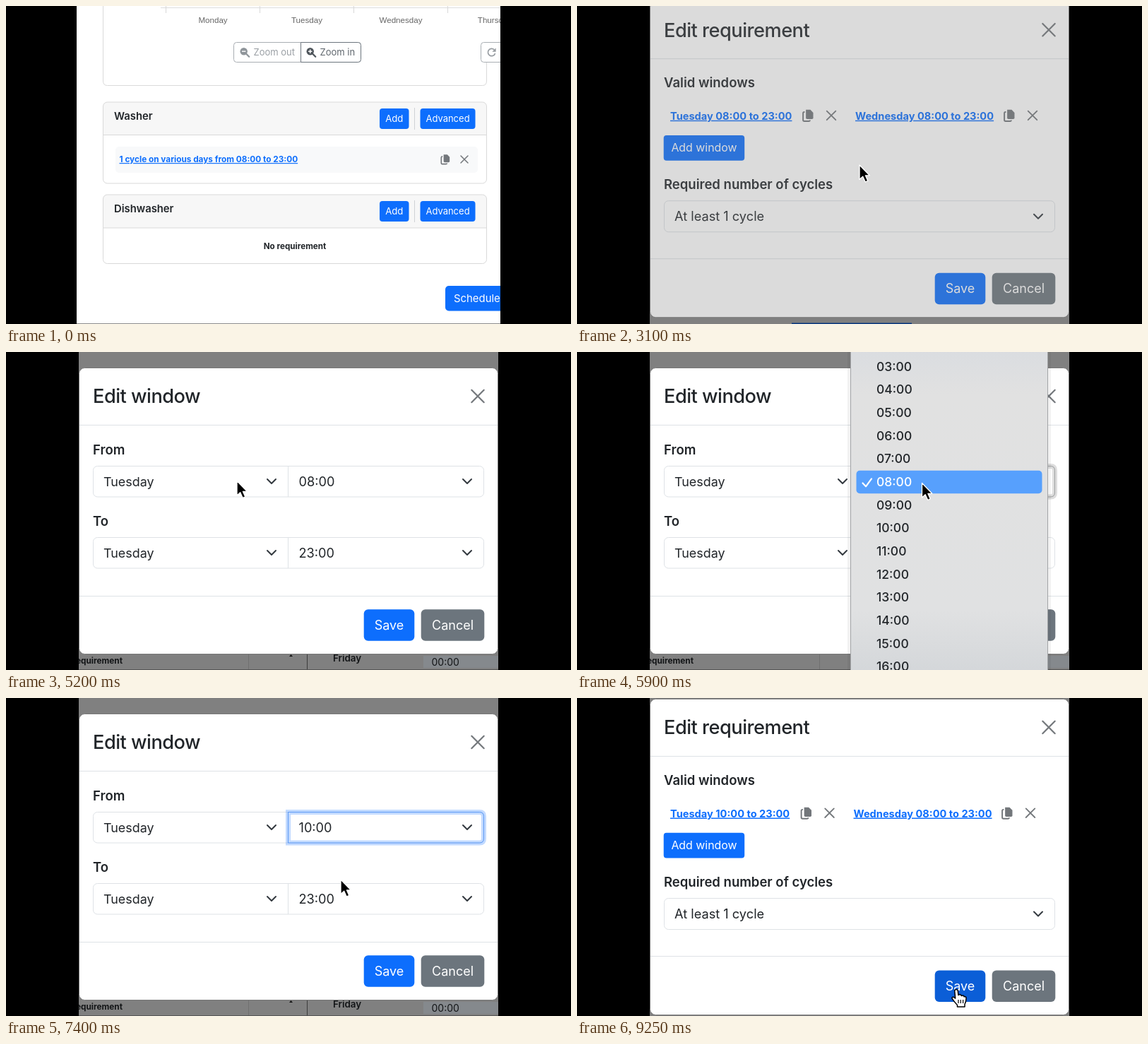
An HTML page for the animation above (9400 ms loop, 800 by 450 pixels).

```html
<!DOCTYPE html>
<html lang="en">
<head>
<meta charset="utf-8">
<title>Edit a requirement window</title>
<style>
  html, body { margin: 0; width: 100%; height: 100%; overflow: hidden; background: #000; }
  svg { display: block; width: 100vw; height: 100vh; }
  text { font-family: Inter, "Open Sans", sans-serif; white-space: pre; }
  .axis { font-family: "Liberation Sans", sans-serif; }
  .link { text-decoration: underline; }
</style>
</head>
<body>
<svg id="stage" viewBox="0 0 800 450"></svg>
<script>
const BLUE = '#0d6efd', HOVER_BLUE = '#0b5ed7', LINK_HOVER = '#0a58ca';
const GRAY = '#6c757d', INK = '#212529', BORDER = '#dee2e6', ICON = '#73777b';
const LOOP = 9400;

// Drawing helpers; text is placed by the middle of its capitals.
const text = (x, y, size, str, { weight = 400, fill = INK, anchor = 'start', extra = '' } = {}) =>
  `<text x="${x}" y="${y + size * 0.345}" font-size="${size}" font-weight="${weight}" fill="${fill}" text-anchor="${anchor}" ${extra}>${str}</text>`;
const rect = (x1, y1, x2, y2, fill, r = 0, extra = '') =>
  `<rect x="${x1}" y="${y1}" width="${x2 - x1}" height="${y2 - y1}" rx="${r}" fill="${fill}" ${extra}/>`;
const stroke = (d, color, width = 1, extra = '') =>
  `<path d="${d}" fill="none" stroke="${color}" stroke-width="${width}" ${extra}/>`;
const cross = (x, y, r, width) =>
  stroke(`M${x - r} ${y - r}l${2 * r} ${2 * r}m0 ${-2 * r}l${-2 * r} ${2 * r}`, ICON, width, 'stroke-linecap="round"');
const chevron = (x, y) =>
  stroke(`M${x - 6} ${y - 3}l6 6l6 -6`, '#343a40', 2, 'stroke-linecap="round" stroke-linejoin="round"');
const button = (x1, y1, x2, y2, label, size, fill = BLUE, id = '') =>
  rect(x1, y1, x2, y2, fill, size > 16 ? 6 : 4, id && `id="${id}"`) +
  text((x1 + x2) / 2, (y1 + y2) / 2, size, label, { fill: '#fff', anchor: 'middle' });
const copyIcon = (x, y, s) => `<g transform="translate(${x} ${y}) scale(${s})">
  <path d="M-2.5 -7H3L6.5 -3.5V3Q6.5 4.5 5 4.5H-1Q-2.5 4.5 -2.5 3Z" fill="${ICON}"/>
  ${stroke('M-4 -4.2H-4.5Q-6 -4.2 -6 -2.7V5.5Q-6 7 -4.5 7H1Q2.5 7 2.5 5.7', ICON, 1.7)}</g>`;
const magnifier = (x, y, color, plus) => `<circle cx="${x - 1.3}" cy="${y - 1.3}" r="5.2" fill="${color}"/>` +
  stroke(`M${x + 2} ${y + 2}l4.2 4.2`, color, 2.3, 'stroke-linecap="round"') +
  stroke(`M${x - 4} ${y - 1.3}h5.4` + (plus ? `M${x - 1.3} ${y - 4}v5.4` : ''), '#fff', 1.4);

const card = (top, split, bottom, name) =>
  rect(137.5, top, 680.5, bottom, '#fff', 6) +
  `<path d="M137.5 ${split}V${top + 6}q0 -6 6 -6H674.5q6 0 6 6V${split}Z" fill="#f7f7f7"/>` +
  stroke(`M137.5 ${split}H680.5`, '#d9d9d9') +
  rect(137.5, top, 680.5, bottom, 'none', 6, 'stroke="#d9d9d9"') +
  text(153, top + 20, 14.8, name, { weight: 600 }) +
  button(529, top + 9, 570.5, top + 38, 'Add', 13.2) +
  stroke(`M578.5 ${top + 8}v31`, '#cfd2d5') +
  button(586.5, top + 9, 664.5, top + 38, 'Advanced', 13);

function pageView() {
  const days = ['Monday', 'Tuesday', 'Wednesday', 'Thursday'].map((day, i) =>
    text(293 + 133 * i, 19.5, 11.6, day, { fill: '#666', anchor: 'middle', extra: 'class="axis"' }) +
    stroke(`M${226.5 + 133 * i} 0v10`, '#d8d8d8')).join('');
  return rect(100, 0, 700, 450, '#fff') +
    stroke('M219 2.5H700', '#dcdcdc') + days +
    stroke('M137.5 0V106q0 6.5 6 6.5H674.5q6 0 6 -6.5V80', '#dadada') +
    rect(322.5, 51.5, 502.5, 79.5, '#fff', 4, 'stroke="#a9aeb3"') +
    `<path d="M417.5 51.5H498.5q4 0 4 4V75.5q0 4 -4 4H417.5Z" fill="#fff" stroke="${GRAY}"/>` +
    magnifier(338, 65.5, '#8f959a', false) + text(350.5, 65.5, 13, 'Zoom out', { fill: '#9a9fa4' }) +
    magnifier(432, 65.5, '#4f565c', true) + text(444.5, 65.5, 13, 'Zoom in', { fill: '#5f666d' }) +
    rect(672.5, 51.5, 720, 79.5, '#fff', 4, 'stroke="#a9aeb3"') +
    stroke('M691.3 61.8A5.2 5.2 0 1 0 692.6 67', '#979ca1', 1.7) +
    '<path d="M693.6 59.5V64.8H688.3Z" fill="#979ca1"/>' +
    card(136, 182.5, 251, 'Washer') +
    rect(155, 199, 668, 236, '#f8f9fa', 5) +
    text(160.5, 217, 11.8, '1 cycle on various days from 08:00 to 23:00', { weight: 700, fill: BLUE, extra: 'class="link" id="cycleLink"' }) +
    copyIcon(622, 217, 0.95) + cross(649, 217, 5, 1.5) +
    card(267, 314, 364.5, 'Dishwasher') +
    text(409, 339.5, 11.7, 'No requirement', { weight: 700, anchor: 'middle' }) +
    rect(622, 396, 716, 431.5, BLUE, 5) + text(634, 414, 14.9, 'Schedule', { fill: '#fff' }) +
    stroke('M100 449.5H700', '#8c8c8c');
}

const dialog = (top, bottom, split, footer, title) =>
  rect(103.5, top, 696.5, bottom, '#fff', 8, 'stroke="#777"') +
  stroke(`M104 ${split}H696M104 ${footer}H696`, BORDER) +
  text(123, top + 40.5, 27.2, title, { weight: 500, extra: 'letter-spacing="-0.5"' }) +
  cross(668, top + 40, 8.7, 2.2);
const footerButtons = (y, id) =>
  button(506.7, y, 578.3, y + 44.5, 'Save', 18, BLUE, id) +
  button(587.7, y, 677.3, y + 44.5, 'Cancel', 18, GRAY);
const heading = (y, str) => text(123, y, 18.5, str, { weight: 600 });
const windowItem = (x, label, copyX, id = '') =>
  text(x, 163.5, 14.6, label, { weight: 700, fill: BLUE, extra: `class="link" ${id && `id="${id}"`}` }) +
  copyIcon(copyX, 162.7, 1.15) + cross(copyX + 33, 162.7, 6.3, 1.8);

const requirementView = () =>
  dialog(1.5, 448.5, 82.5, 365.5, 'Edit requirement') +
  heading(116.5, 'Valid windows') +
  `<g id="itemsBefore">${windowItem(132, 'Tuesday 08:00 to 23:00', 327, 'tuesdayLink')}${windowItem(394, 'Wednesday 08:00 to 23:00', 612)}</g>` +
  `<g id="itemsAfter">${windowItem(132, 'Tuesday 10:00 to 23:00', 324.5)}${windowItem(391.5, 'Wednesday 08:00 to 23:00', 609)}</g>` +
  button(122.7, 190.7, 237.2, 226.5, 'Add window', 15.9) +
  heading(260.5, 'Required number of cycles') +
  rect(123.5, 283.5, 676.5, 327.5, '#fff', 6, `stroke="${BORDER}"`) +
  text(138, 306, 18.2, 'At least 1 cycle') + chevron(653, 305.5) +
  footerButtons(385.5, 'saveRequirement');

const selectPair = (y, hour, id) =>
  rect(123.5, y, 676.5, y + 43.5, '#fff', 6, `stroke="${BORDER}"`) + stroke(`M399.5 ${y}v43.5`, BORDER) +
  text(138, y + 22.3, 17.9, 'Tuesday') + chevron(376, y + 21.5) +
  text(414.5, y + 22.3, 18.2, hour, { extra: `id="${id}"` }) + chevron(653, y + 21.5);
const FOCUS_PATH = 'M399.5 161.5H670.5q6 0 6 6V199q0 6 -6 6H399.5Z';
const windowView = () =>
  dialog(22.5, 427.5, 103.5, 345.5, 'Edit window') +
  heading(138.3, 'From') + selectPair(161.5, '08:00', 'fromHour') +
  `<g id="focusRing">${stroke(FOCUS_PATH, 'currentColor', 7, 'stroke-opacity=".25"')}${stroke(FOCUS_PATH, 'currentColor', 1, 'stroke-opacity=".5"')}</g>` +
  heading(239.3, 'To') + selectPair(262.5, '23:00', 'toHour') +
  footerButtons(364.3, 'saveWindow');

const rowY = hour => 184 + (hour - 8) * 32.65;
function menuView() {
  let rows = '';
  for (let h = 2; h <= 16; h++)
    rows += text(424, rowY(h), 17.5, String(h).padStart(2, '0') + ':00', { weight: 500, extra: `data-hour="${h}"` });
  return rect(383, -10, 671, 460, '#000', 0, 'opacity=".05"') +
    rect(387.5, -10, 666.5, 460, 'url(#menuFill)', 0, 'stroke="#a2a4a6"') +
    rect(395.5, 168, 658.5, 200.5, '#57a0fd', 5, 'id="highlight"') + rows +
    stroke('M404.5 185.5l4.5 4.8l8 -11', INK, 2.2, 'id="check" stroke-linecap="round" stroke-linejoin="round"');
}

// Dimmed page seen behind the dialogs.
const backdropView = () =>
  rect(103, 0, 697, 450, '#808080') +
  `<g id="behind">${rect(591, 430, 697, 447, '#85898d')}` +
  stroke('M343.5 428v22', '#707070') + stroke('M426.5 428v22', '#3c3c3c') +
  '<path d="M401 431h5l-2.5 -3Z" fill="#111"/>' +
  text(165, 436.5, 11.8, 'No requirement', { weight: 700, fill: '#131517', anchor: 'end' }) +
  text(463, 433, 13.4, 'Friday', { weight: 600, fill: '#131517' }) +
  text(602.5, 439, 14, '00:00', { fill: '#131517' }) +
  stroke('M103 449.5H697', '#555') + '</g>' +
  rect(304, 448.5, 474, 450, '#07377f', 0, 'id="blueEdge"');

const cursorView = () => `
  <path id="arrow" d="M0 0V20.5L4.7 16.2L8.2 24L11.8 22.4L8.4 14.8H14.3Z" fill="#000" stroke="#fff" stroke-width="1.3" stroke-linejoin="round"/>
  <g id="hand">
    <path d="M-2.3 2C-2.3 -.7 2 -.7 2.3 2L3 8C5 6.5 7 7 7.3 9C9 7.8 11 8.5 11 10.2C13 9.4 14.3 10.5 14 13C14 17 13 19 12 21V24.5H1.5V22C-1.5 19 -3.5 16 -5.8 13C-7 10.5 -3.5 9.5 -1.3 12.5Z"
      fill="#fff" stroke="#000" stroke-width="1.5" stroke-linejoin="round"/>
    ${stroke('M3 14.5v5M6.3 14.5v5M9.6 14.5v5', '#000', 1.2)}
  </g>`;

const stage = document.getElementById('stage');
stage.innerHTML = `<defs>
    <linearGradient id="menuFill" x2="0" y2="1"><stop offset="0" stop-color="#d9dce0"/>
      <stop offset=".15" stop-color="#e1e1e1"/><stop offset=".8" stop-color="#e0e1e2"/><stop offset="1" stop-color="#d3d6d9"/></linearGradient>
    <clipPath id="pageClip"><path d="M100 0H700V450H100Z"/></clipPath>
    <clipPath id="modalClip"><path d="M103 0H697V450H103Z"/></clipPath>
  </defs>
  <rect width="800" height="450"/>
  <g id="page" clip-path="url(#pageClip)">${pageView()}</g>
  <g id="modal" clip-path="url(#modalClip)">${rect(103, 0, 697, 450, '#fff')}
    <g id="backdrop">${backdropView()}</g>
    <g id="requirement">${requirementView()}</g>
    <g id="window">${windowView()}</g>
    <g id="menu">${menuView()}</g>
  </g>
  <g clip-path="url(#pageClip)"><g id="cursor">${cursorView()}</g></g>`;

const el = {};
stage.querySelectorAll('[id]').forEach(node => { el[node.id] = node; });
const rowLabels = [...stage.querySelectorAll('[data-hour]')];

const ramp = (t, from, to) => Math.min(1, Math.max(0, (t - from) / (to - from)));
const ease = u => u * u * (3 - 2 * u);
const show = (id, on) => el[id].setAttribute('visibility', on ? 'inherit' : 'hidden');
const paint = (id, color) => el[id].setAttribute('fill', color);
const fade = (id, amount, slide = 0) => {
  show(id, amount > 0);
  el[id].setAttribute('opacity', amount);
  if (slide) el[id].setAttribute('transform', `translate(0 ${-slide * (1 - ease(amount))})`);
};

// [time, x, y] of the cursor tip
const path = [
  [300, 712, 330], [1600, 371, 219], [2899, 371, 219], [2900, 400, 225], [3300, 400, 225],
  [4150, 212.5, 154.5], [4700, 212.5, 154.5], [5200, 327, 182.5], [5750, 488.5, 185.5], [6500, 488.5, 185.5],
  [7000, 474, 257], [7450, 474, 257], [7850, 537, 391], [8200, 537, 391], [8600, 537, 412.5]
];
function cursorAt(t) {
  const next = path.findIndex(k => k[0] > t);
  if (next === 0) return path[0].slice(1);
  if (next < 0) return path[path.length - 1].slice(1);
  const [t0, x0, y0] = path[next - 1], [t1, x1, y1] = path[next];
  const u = ease(ramp(t, t0, t1));
  return [x0 + (x1 - x0) * u, y0 + (y1 - y0) * u];
}

function render(t) {
  const inModal = t >= 2900, picked = t >= 7100;
  const [x, y] = cursorAt(t);
  show('page', !inModal);
  show('modal', inModal);

  const overCycle = !inModal && x < 415 && y < 226;
  const overTuesday = t >= 4100 && t < 4500;
  const overSave = t >= 7500 && x > 507 && y > 365;
  paint('cycleLink', overCycle ? LINK_HOVER : BLUE);
  paint('tuesdayLink', overTuesday ? LINK_HOVER : BLUE);
  paint('saveWindow', overSave ? HOVER_BLUE : BLUE);
  paint('saveRequirement', overSave ? HOVER_BLUE : BLUE);

  fade('backdrop', ramp(t, 2850, 3050));
  show('behind', t >= 4400 && t < 8100);
  show('blueEdge', t < 4400);
  const firstVisit = ramp(t, 2850, 3200) - ramp(t, 4400, 4600);
  fade('requirement', t < 7900 ? firstVisit : ramp(t, 7900, 8100), 40);
  fade('window', ramp(t, 4500, 4800) - ramp(t, 7900, 8050), 40);
  show('itemsBefore', !picked);
  show('itemsAfter', picked);

  el.fromHour.textContent = picked ? '10:00' : '08:00';
  fade('focusRing', ramp(t, 5850, 5900));
  el.focusRing.setAttribute('color', picked ? BLUE : '#777');

  fade('menu', t < 5900 ? 0 : 1 - ramp(t, 7100, 7300));
  const hour = y < 200.5 ? 8 : y < 233 ? 9 : 10;
  el.highlight.setAttribute('y', rowY(hour) - 16.2);
  el.check.setAttribute('stroke', hour === 8 ? '#fff' : INK);
  rowLabels.forEach(label => label.setAttribute('fill', +label.dataset.hour === hour ? '#fff' : INK));

  const pointing = overCycle || (t >= 4250 && t < 4500) || overSave;
  show('cursor', t >= 300);
  show('hand', pointing);
  show('arrow', !pointing);
  el.cursor.setAttribute('transform', `translate(${x} ${y}) scale(${inModal ? 1 : 0.88})`);
}

const start = performance.now();
function tick() {
  render((performance.now() - start) % LOOP);
  requestAnimationFrame(tick);
}
tick();
</script>
</body>
</html>
```
